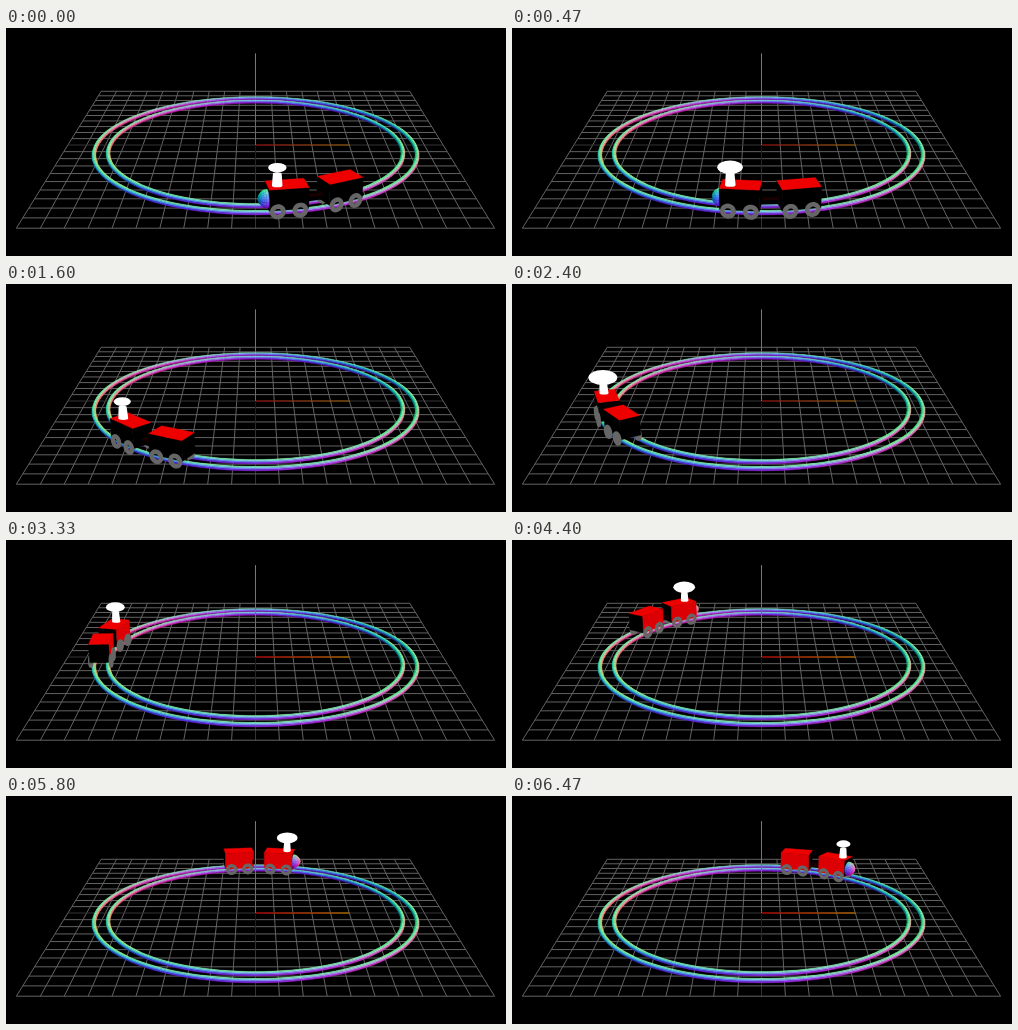
These frames come from a looping animation (500 px wide and 228 px high, 6540 ms). An HTML page with a canvas:

```html
<!DOCTYPE html>
<html>
<head>
<meta charset="utf-8">
<style>
html, body { margin: 0; width: 100%; height: 100%; overflow: hidden; background: #000; }
canvas { display: block; }
</style>
</head>
<body>
<canvas id="stage" width="500" height="228"></canvas>
<script>
const LOOP = 6540, STEP = 200 / 3, TAU = Math.PI * 2;
const SIN = 0.348, COS = 0.9375, DIST = 43.5, FOCAL = 816;
const EYE = [0, DIST * SIN, DIST * COS];
const TRACK = 8.11, GAUGE = 0.36;
// smoke width in world units: [step, width]
const PUFF = [[0, .8], [14, 1.43], [24, .8], [36, 1.46], [50, 1.05], [58, .8],
  [66, 1.32], [76, .69], [86, 1.3], [97, .85]];

const stage = document.getElementById('stage');
const screen = stage.getContext('2d');
const backdrop = document.createElement('canvas');
backdrop.width = 500;
backdrop.height = 228;
let ctx = backdrop.getContext('2d');

const toView = ([x, y, z]) => [x, y * COS - z * SIN, y * SIN + z * COS];

function project(p) {
  const [x, y, z] = toView(p), s = FOCAL / (DIST - z);
  return [249.5 + x * s, 117 - y * s, s];
}

function facing(n, p) {
  return n.reduce((sum, v, i) => sum + v * (EYE[i] - p[i]), 0) > 0;
}

function normalColor(n) {
  return 'rgb(' + toView(n).map(v => Math.round(127.5 * (v + 1))) + ')';
}

function trace(points, close) {
  ctx.beginPath();
  points.forEach(p => ctx.lineTo(...project(p).slice(0, 2)));
  if (close) ctx.closePath();
}

function fill(points, color) {
  trace(points, true);
  ctx.fillStyle = ctx.strokeStyle = color;
  ctx.lineWidth = 0.3;
  ctx.fill();
  ctx.stroke();
}

function line(a, b, color, endColor = color) {
  const [x0, y0] = project(a), [x1, y1] = project(b);
  const paint = ctx.createLinearGradient(x0, y0, x1, y1);
  paint.addColorStop(0, color);
  paint.addColorStop(1, endColor);
  trace([a, b]);
  ctx.strokeStyle = paint;
  ctx.lineWidth = 1;
  ctx.stroke();
}

function drawGrid() {
  for (let i = -10; i <= 10; i++) {
    const color = i ? '#626262' : '#333';
    line([i, 0, -10], [i, 0, 10], color);
    line([-10, 0, i], [10, 0, i], color);
  }
}

function drawAxes() {
  line([0, 0, 0], [5, 0, 0], '#a00000', '#a06000');
  line([0, 0, 0], [0, 0, 5], '#0000d0', '#0030d0');
  line([0, 0, 0], [0, 5, 0], '#00b000', '#40b000');
}

function drawRail(radius) {
  const tube = 0.1, around = 120, sides = 10;
  const normal = (u, v) => [Math.sin(u) * Math.cos(v), Math.sin(v), Math.cos(u) * Math.cos(v)];
  const point = (u, v) => {
    const r = radius + tube * Math.cos(v);
    return [r * Math.sin(u), tube * Math.sin(v), r * Math.cos(u)];
  };
  const du = TAU / around, dv = TAU / sides;
  for (let i = 0; i < around; i++) {
    for (let j = 0; j < sides; j++) {
      const u = i * du, v = j * dv, n = normal(u + du / 2, v + dv / 2);
      if (!facing(n, point(u + du / 2, v + dv / 2))) continue;
      fill([point(u, v), point(u + du, v), point(u + du, v + dv), point(u, v + dv)], normalColor(n));
    }
  }
}

// Local axes of a vehicle: a = ahead, y = up, o = outward from the track centre
function frameAt(angle) {
  const s = Math.sin(angle), c = Math.cos(angle);
  const dir = (a, y, o) => [o * s - a * c, y, o * c + a * s];
  return { dir, at: (a, y, o) => dir(a, y, TRACK + o) };
}

function drawBox(f, length, width, low, high, top, inner) {
  const a = length / 2, o = width / 2, mid = (low + high) / 2;
  const faces = [
    [[1, 0, 0], [a, mid, 0], [[a, low, -o], [a, low, o], [a, high, o], [a, high, -o]], '#000'],
    [[-1, 0, 0], [-a, mid, 0], [[-a, low, -o], [-a, low, o], [-a, high, o], [-a, high, -o]], '#000'],
    [[0, 0, 1], [0, mid, o], [[-a, low, o], [a, low, o], [a, high, o], [-a, high, o]], '#000'],
    [[0, 0, -1], [0, mid, -o], [[-a, low, -o], [a, low, -o], [a, high, -o], [-a, high, -o]], inner],
    [[0, 1, 0], [0, high, 0], [[-a, high, -o], [a, high, -o], [a, high, o], [-a, high, o]], top]
  ];
  for (const [n, centre, corners, color] of faces) {
    if (facing(f.dir(...n), f.at(...centre))) fill(corners.map(p => f.at(...p)), color);
  }
}

function drawWheels(f, side) {
  for (const a of [0.5, -0.5]) {
    const ring = [];
    for (let i = 0; i < 24; i++) {
      const t = i / 24 * TAU;
      ring.push(f.at(a + 0.25 * Math.cos(t), 0.1 + 0.25 * Math.sin(t), side * 0.53));
    }
    trace(ring, true);
    ctx.strokeStyle = '#666';
    ctx.lineWidth = 0.2 * project(ring[0])[2];
    ctx.stroke();
  }
}

// Half sphere on the front of the engine
function drawNose(f) {
  const r = 0.41, rings = 6, sides = 20, du = TAU / 4 / rings, dv = TAU / sides;
  const normal = (u, v) => [Math.sin(u), Math.cos(u) * Math.sin(v), Math.cos(u) * Math.cos(v)];
  const point = (u, v) => {
    const [a, y, o] = normal(u, v);
    return f.at(0.86 + r * a, 0.52 + r * y, r * o);
  };
  for (let i = 0; i < rings; i++) {
    for (let j = 0; j < sides; j++) {
      const u = i * du, v = j * dv, n = f.dir(...normal(u + du / 2, v + dv / 2));
      if (!facing(n, point(u + du / 2, v + dv / 2))) continue;
      fill([point(u, v), point(u + du, v), point(u + du, v + dv), point(u, v + dv)], normalColor(n));
    }
  }
}

function puffWidth(n) {
  const i = Math.max(1, PUFF.findIndex(k => k[0] >= n));
  const [n0, w0] = PUFF[i - 1], [n1, w1] = PUFF[i];
  return w0 + (w1 - w0) * (1 - Math.cos(Math.PI * (n - n0) / (n1 - n0))) / 2;
}

function drawChimney(f, n) {
  const [x0, y0, s] = project(f.at(0.45, 1.15, 0.08));
  const [x1, y1] = project(f.at(0.45, 1.7, 0.08));
  const [x2, y2] = project(f.at(0.45, 1.98, 0.08));
  const low = 0.23 * s, high = 0.19 * s, puff = puffWidth(n) / 2 * s;
  ctx.fillStyle = '#fff';
  ctx.beginPath();
  ctx.ellipse(x1, y1, high, high * SIN, 0, Math.PI, TAU);
  ctx.ellipse(x0, y0, low, low * SIN, 0, 0, Math.PI);
  ctx.fill();
  ctx.beginPath();
  ctx.ellipse(x2, y2, puff, puff * 0.52, 0, 0, TAU);
  ctx.fill();
}

function drawVehicle(f, engine, n) {
  const near = facing(f.dir(0, 0, 1), f.at(0, 0.5, 0.5)) ? 1 : -1;
  const noseNear = facing(f.dir(1, 0, 0), f.at(0.9, 0.5, 0));
  drawWheels(f, -near);
  if (engine && !noseNear) drawNose(f);
  drawBox(f, 1.75, 1.05, 0.15, 1.15, '#ee0000', '#dc0004');
  if (engine && noseNear) drawNose(f);
  drawWheels(f, near);
  if (engine) drawChimney(f, n);
}

function drawTrain(n) {
  const angle = 0.17 - 0.0402 * n;
  const engine = frameAt(angle), link = frameAt(angle + 0.158), wagon = frameAt(angle + 0.315);
  const depth = f => toView(f.at(0, 0, 0))[2];
  const parts = [
    () => drawVehicle(engine, true, n),
    () => drawBox(link, 0.8, 0.3, 0.3, 0.5, '#180000', '#180000'),
    () => drawVehicle(wagon, false, n)
  ];
  if (depth(engine) > depth(wagon)) parts.reverse();
  parts.forEach(draw => draw());
  // The axes stand in front of the far half of the track
  if (Math.cos(angle) < 0) drawAxes();
}

ctx.fillStyle = '#000';
ctx.fillRect(0, 0, 500, 228);
drawGrid();
drawAxes();
drawRail(TRACK + GAUGE);
drawRail(TRACK - GAUGE);
ctx = screen;

const begin = performance.now();

function render() {
  const t = (performance.now() - begin) % LOOP;
  const n = Math.min(97, Math.floor((t + 5) / STEP));
  ctx.drawImage(backdrop, 0, 0);
  drawTrain(n);
  requestAnimationFrame(render);
}
render();
</script>
</body>
</html>
```
